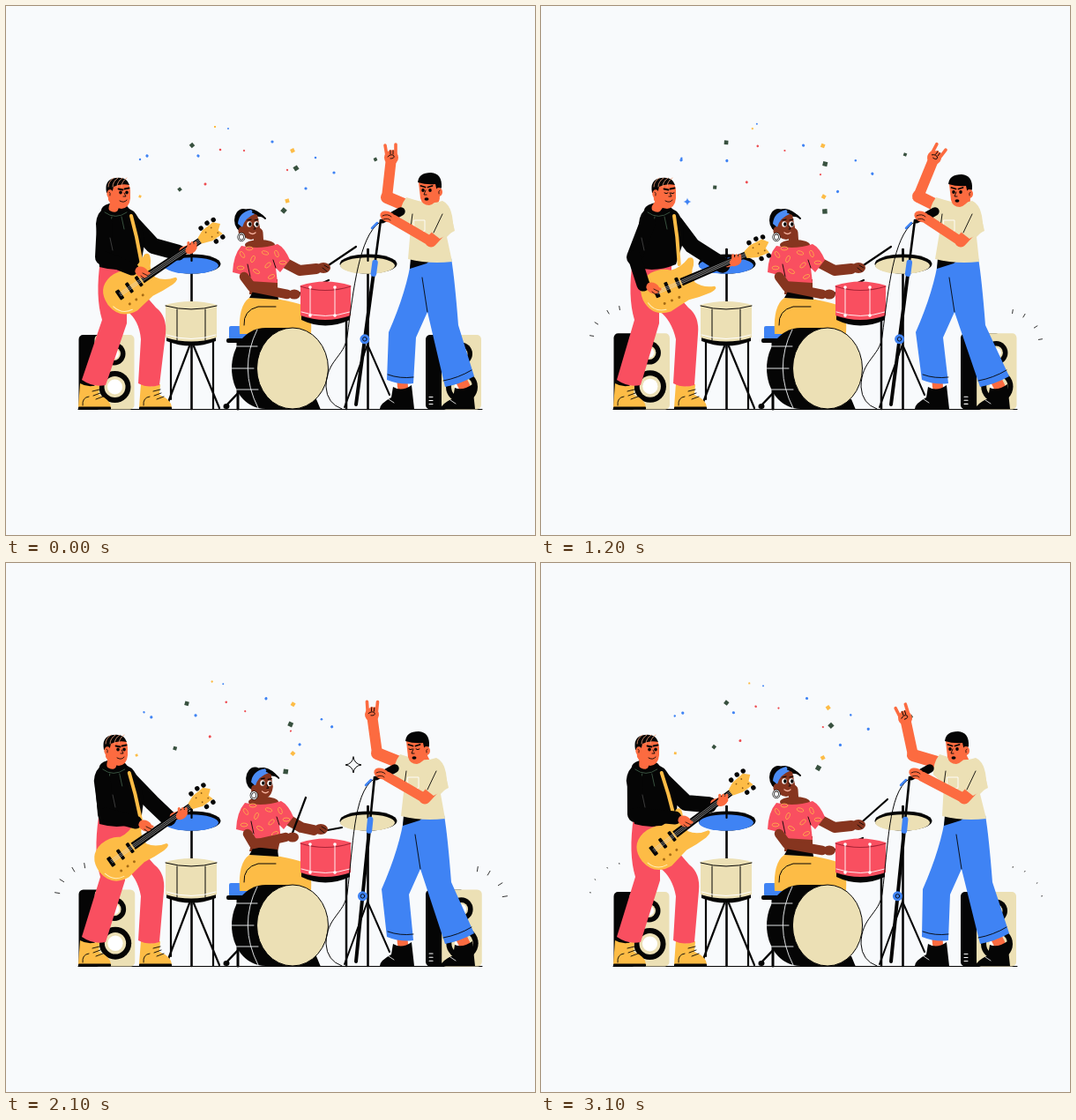
An HTML page with a canvas that plays this animation: 600 px wide and 600 px high, repeating every 3200 ms.

```html
<!DOCTYPE html>
<html lang="en">
<head>
<meta charset="utf-8">
<title>Band</title>
<style>
html, body { margin: 0; width: 100%; height: 100%; overflow: hidden; background: #f8fafc; }
canvas { display: block; width: 600px; height: 600px; }
</style>
</head>
<body>
<canvas id="stage"></canvas>
<script>
const LOOP = 3200, STEP = 100, TAU = Math.PI * 2;
const BG = '#f8fafc', INK = '#050505', CREAM = '#ece0b5', RED = '#f94f60', BLUE = '#3f83f4',
  GOLD = '#fdbc46', SKIN = '#fc6b40', BROWN = '#86351f', WHITE = '#fff', GREEN = '#38513f';
const canvas = document.getElementById('stage');
const g = canvas.getContext('2d');
const ratio = window.devicePixelRatio || 1;
canvas.width = canvas.height = 600 * ratio;
g.lineCap = g.lineJoin = 'round';

// ---- drawing helpers
function fill(color, d) { g.fillStyle = color; g.fill(new Path2D(d)); }
function line(color, w, d) { g.strokeStyle = color; g.lineWidth = w; g.stroke(new Path2D(d)); }
function limb(color, w, ...pts) { line(color, w, 'M' + pts.map(p => p.join(' ')).join('L')); }
function oval(color, x, y, rx, ry = rx, turn = 0) {
  g.fillStyle = color;
  g.beginPath(); g.ellipse(x, y, rx, ry, turn, 0, TAU); g.fill();
}
function ring(color, w, x, y, rx, ry = rx, turn = 0) {
  g.strokeStyle = color; g.lineWidth = w;
  g.beginPath(); g.ellipse(x, y, rx, ry, turn, 0, TAU); g.stroke();
}
function box(color, x, y, w, h, r = 0) {
  g.fillStyle = color;
  g.beginPath(); g.roundRect(x, y, w, h, r); g.fill();
}
function at(x, y, turn, draw) {
  g.save(); g.translate(x, y); g.rotate(turn); draw(); g.restore();
}

// Smooth cyclic interpolation through uneven keys.
function track(t, period, times, vals) {
  const n = times.length, p = ((t % period) + period) % period;
  const T = k => times[(k + n) % n] + Math.floor(k / n) * period;
  const V = k => vals[(k + n) % n];
  let i = n - 1;
  while (i > 0 && times[i] > p) i--;
  const slope = k => (V(k + 1) - V(k - 1)) / (T(k + 1) - T(k - 1));
  const h = T(i + 1) - T(i), u = (p - T(i)) / h, v = 1 - u;
  return V(i) * (1 + 2 * u) * v * v + V(i + 1) * (3 - 2 * u) * u * u
    + h * u * v * (slope(i) * v - slope(i + 1) * u);
}

// ---- speakers and drums
function speaker(x, u) {
  const grow = 0.05 * Math.exp(-(((u - 0.5) / 0.13) ** 2));
  g.save();
  g.translate(x, 457.5);
  g.scale(1 + grow * 0.4, 1 + grow);
  box(INK, 0, -84.5, 44, 84.5, 5);
  box(CREAM, 18, -84.5, 45, 84.5, 5);
  oval(INK, 40, -63, 13);
  oval(CREAM, 40, -63, 7.5);
  oval(WHITE, 40, -63, 5.5);
  oval(INK, 41, -25.5, 18);
  oval(CREAM, 41, -25.5, 12);
  oval(WHITE, 41, -25.5, 8.5);
  for (let i = 0; i < 3; i++) limb(WHITE, 1, [4, -14 + i * 4], [8, -14 + i * 4]);
  g.restore();
}

function noise(side, u) {
  const len = u < 0.2 ? 0 : u < 0.5 ? 10 * (u - 0.2) / 0.3 : Math.max(0.6, 10 * (2 - 2 * u) ** 3);
  if (!len || u > 0.95) return;
  const far = u < 0.5 ? 30 + len : 40;
  g.save();
  g.translate(side < 0 ? 95 : 529, side < 0 ? 380 : 384);
  g.scale(-side, 1);
  for (const a of [189, 212, 240, 261]) {
    const c = Math.cos(a * TAU / 360), s = Math.sin(a * TAU / 360);
    limb('#333', 1, [c * (far - len), s * (far - len)], [c * far, s * far]);
  }
  g.restore();
}

function cymbal(x, color) {
  limb(INK, 2.6, [x, 276], [x, 457]);
  oval(INK, x + 0.5, 292.5, 32.5, 11);
  oval(color, x - 0.5, 294.5, 31, 9.2);
  limb(INK, 2.2, [x, 276], [x, 289]);
}

function snare() {
  limb(INK, 2.2, [187, 380], [187, 446]);
  limb(INK, 2.2, [235, 380], [235, 457]);
  limb(INK, 2.2, [208, 386], [183, 452]);
  limb(INK, 2.2, [213, 386], [242, 456]);
  fill(INK, 'M182 372V380Q210 391 238 380V372Z');
  fill(CREAM, 'M181 339Q210 331 239 339V376Q210 385 181 376Z');
  line(INK, 1, 'M181 340Q210 348 239 340M194 344V379M226 344V379');
  line(WHITE, 1, 'M182 373Q210 382 238 373');
}

function tom() {
  limb(INK, 2.5, [386, 350], [386, 457]);
  fill(INK, 'M335 350V356Q362 369 390 356V350Z');
  fill(RED, 'M334 317Q362 308 391 317V351Q362 361 334 351Z');
  line('#a92436', 1.1, 'M334 318Q362 327 391 318');
  line(WHITE, 0.9, 'M335 347Q362 356 390 347M345 320V352M373 320V352');
  for (const x of [345, 373]) { oval(WHITE, x, 319, 1.8); oval(WHITE, x, 351, 1.8); }
}

function bass(grow) {
  limb(INK, 2.5, [268, 434], [248, 455]);
  oval(INK, 250, 454, 3.5, 3);
  fill(INK, 'M318 458L330 446H352L357 458Z');
  fill(INK, 'M325 365H295C270 365 256 388 256 411S270 457 295 457H325Z');
  line(BG, 0.9, 'M259 386H285M256 411H281M259 435H286M285 367Q263 411 286 456');
  oval(CREAM, 325, 411, 40.5 + grow, 46);
  ring(INK, 1, 325, 411, 40.5 + grow, 46);
}

function stool() {
  limb(INK, 3, [263, 378], [263, 457]);
  box(BLUE, 253, 363, 30, 15, 2);
  box(INK, 250, 377, 32, 5, 2);
}

// ---- drummer
function drummer(t) {
  const D = [0, 60, 140, 180, 320, 540, 560];
  const k = (...v) => track(t, 640, D, v);
  const phase = t % 640;
  const hx = k(275, 276, 282, 290, 311, 275, 275), hy = k(247, 249, 250, 249, 250, 247, 247);
  const s = k(0, 0, 2, 4, 8, 0, 0);
  const left = [k(327, 327, 322, 325, 325, 327, 327), k(327, 325, 314, 311, 315, 326, 327)];
  const leftTip = [k(366, 367, 351, 340, 332, 365, 366), k(311, 310, 275, 266, 268, 312, 311)];
  const right = [k(360, 360, 358, 357, 357, 360, 360), k(297, 296, 295, 302, 298, 297, 297)];
  const rightTip = [k(397, 393, 395, 381, 397, 393, 397), k(273, 268, 267, 300, 273, 268, 273)];

  fill(GOLD, 'M265 372Q263 340 276 331L306 332Q334 337 343 342Q347 347 346 372Z');
  line(INK, 1, 'M270 362Q269 345 286 341L306 341');
  fill(BROWN, `M${277 + s} 308L${308 + s} 310L308 328L276 327Z`);
  fill(INK, 'M281 322L308 325L309 333L276 331Z');

  limb(BROWN, 12, [312 + s, 289], [333 + s * 0.5, 300], [right[0] - 8, right[1] + 1]);
  limb(BROWN, 11, [286 + s * 0.6, 257], [287 + s, 273]);
  oval(BROWN, 288 + s, 271, 17, 6);
  at(s, 0, 0, () => {
    fill(RED, 'M267 272Q288 277 308 270Q316 274 322 288L311 302L306 297L308 314L276 312L277 307L257 302Q258 282 267 272Z');
    for (const [x, y, a] of [[268, 282, 1], [266, 297, 0], [280, 287, 2], [284, 301, 0.5],
      [294, 280, 0.3], [297, 294, 2.4], [307, 281, 1.2], [314, 291, 0], [301, 307, 2.7], [276, 275, 0]])
      ring('#ffa04d', 1, x, y, 4, 2, a);
    line(INK, 0.9, 'M277 307L274 293M306 297L303 288');
  });
  limb(BROWN, 10.5, [270 + s, 307], [279 + s * 0.5, 319], [left[0] - 8, left[1]]);
  limb(INK, 2.2, [left[0] - 3, left[1] + 3], leftTip);
  oval(BROWN, ...left, 7, 5.5);
  limb(INK, 2.2, [right[0] - 3, right[1] + 3], rightTip);
  oval(BROWN, ...right, 8, 6);
  line(INK, 0.8, `M${right[0] + 1} ${right[1] - 3}l5 3m-7 0l5 4`);

  const turn = (hx - 275) / 36;
  at(hx, hy, turn * 0.12, () => {
    oval(INK, -6 - turn * 5, -4, 10, 13);
    fill(INK, 'M-13 2Q-15 -17 2 -17Q11 -16 20 -6Q10 -10 5 -7L-5 8Z');
    fill(BROWN, 'M-8 -5Q0 -15 10 -10L13 4Q12 17 3 18Q-6 17 -9 8Z');
    fill('#4b8cf5', 'M-12 0Q-11 -13 3 -16L7 -11Q-4 -7 -7 4Z');
    line(INK, 1.8, 'M5 -13Q13 -12 19 -6');
    oval(BROWN, -8, 8, 3.5, 4.5);
    ring(INK, 2.4, -8, 15, 3.4, 4);
    ring(WHITE, 1.1, -8, 15, 3.4, 4);
    const shut = phase >= 40 && phase <= 150;
    for (const x of [1, 9]) {
      line(INK, 1.2, `M${x - 2} -4l4 -1`);
      if (shut) line(INK, 1, `M${x - 2} 1q2 2 4 0`);
      else { oval(WHITE, x, 0.5, 2.7, 3.2); oval(INK, x + 0.8, 0.5, 1.7, 2.2); }
    }
    line(INK, 0.9, 'M6 2l2 4h-2');
    line('#f6b3a0', 1.3, 'M1 10q4 3 7 0');
  });

  if (phase >= 110 && phase <= 165)
    line('#333', 1, 'M375 264l4 5M386 254l4 8M400 247l-1 14M414 252l-5 9M422 262l-7 4');
}

// ---- guitarist
function guitar() {
  fill(GOLD, 'M-38 2Q-38 -20 -18 -23Q-4 -24 4 -17Q16 -15 28 -22Q36 -22 30 -12Q22 -4 24 6Q30 16 43 19Q46 23 36 24Q22 24 10 22Q-2 24 -14 26Q-36 24 -38 2Z');
  box(INK, -23, -6, 5, 12, 1);
  box(INK, -9, -7, 4, 13, 1);
  box(INK, 4, -7, 4, 13, 1);
  for (const x of [-17, -8, 1]) oval('#a46a16', x, 15, 1.5);
  line('#fff0bd', 1, 'M-34 7Q-31 20 -18 22');
  fill(INK, 'M10 -4.5L92 -3.5V3.5L10 4.5Z');
  for (const y of [-1.7, 0, 1.7]) limb('#ddd', 0.5, [-20, y], [94, y]);
  for (const [x, y] of [[98, -11], [107, -12], [115, -11], [104, 11], [113, 11]]) oval(INK, x, y, 2.7);
  fill(GOLD, 'M89 -4L98 -8L113 -9L119 -3L113 2L115 8L101 8L89 4Z');
  for (const [x, y] of [[100, -4], [108, -5], [103, 4], [111, 4]]) oval('#8d5a15', x, y, 0.9);
}

function boot(x) {
  fill(GOLD, `M${x + 2} 428Q${x + 12} 434 ${x + 24} 429L${x + 23} 441Q${x + 36} 446 ${x + 37} 455H${x}Z`);
  box(INK, x, 454.5, 37, 3.2, 1);
  line(INK, 0.9, `M${x + 16} 437l8 -2M${x + 17} 442l8 -3M${x + 20} 446l8 -3M${x + 5} 453Q${x + 4} 444 ${x + 12} 443`);
}

function guitarist(t) {
  const G = [0, 133, 533, 567, 700, 967, 1033];
  const k = (...v) => track(t, LOOP / 3, G, v);
  const hx = k(128, 140, 138, 139, 125, 121, 125);
  const gx = k(146, 150, 152, 145, 145, 144, 136), gy = k(316, 317, 315, 315, 319, 314, 327);
  const turn = k(-34, -23, -28, -30, -35, -37, -35) * TAU / 360;
  const hip = k(0, -3, 0, 0, 0, -2, -2);
  const elbow = [k(110, 106, 113, 107, 98, 107, 113), 285];
  const strum = v => track(t, LOOP / 6, [0, 33, 133, 167, 433, 500], v);
  const hand = [strum([155, 148, 128, 131, 164, 159]), strum([302, 308, 320, 322, 293, 298])];
  const c = 0.75 * (hx - 128);
  const onNeck = d => [gx + d * Math.cos(turn) - 2 * Math.sin(turn), gy + d * Math.sin(turn) + 2 * Math.cos(turn)];
  const fret = onNeck(77);

  boot(82);
  boot(151);
  fill(RED, `M${107 + hip} 288Q${101 + hip} 330 ${109 + hip} 356L86 424Q99 433 113 430L${137 + hip} 360V346Q${151 + hip} 356 153 378L150 428Q161 434 174 430L${181 + hip} 372Q${183 + hip} 352 ${170 + hip} 342L${151 + hip} 320V288Z`);
  line(INK, 0.9, `M${137 + hip} 346L${133 + hip} 337`);

  limb(INK, 18, [143 + c, 246], [167 + c * 0.5, 272], [fret[0] - 16, fret[1] + 5]);
  limb(SKIN, 9, [fret[0] - 10, fret[1] + 3], fret);
  oval(INK, 124 + c, 232, 16, 9);
  fill(INK, `M${113 + c} 229Q${103 + c} 233 ${102 + c} 247L106 296Q130 303 153 293L${157 + c * 0.4} 270Q${155 + c} 244 ${145 + c} 233L${133 + c} 226Z`);
  limb(SKIN, 11, [hx - 4, 222], [122 + c, 229]);
  line(INK, 5, `M${112 + c} 231Q${124 + c} 242 ${136 + c} 230`);
  line(GREEN, 1, `M${120 + c} 239L${117 + c} 255M${131 + c} 239L${134 + c} 253M${112 + c} 234Q${124 + c} 243 ${137 + c} 234`);
  limb(GOLD, 4, [142 + c, 238], [148 + c * 0.7, 262], [154 + c * 0.3, 293]);
  const out = Math.max(0, (106 - elbow[0]) / 8);
  if (out > 0.3) limb(GOLD, 3.5, [113 + c, 262], [132 + c, 298]);

  at(gx, gy, turn, guitar);
  oval(SKIN, fret[0] - 1, fret[1] + 1, 7, 5, turn);
  for (let i = 0; i < 3; i++)
    limb(SKIN, 3, [fret[0] - 4 + i * 4, fret[1]], [fret[0] - 4 + i * 4, fret[1] - 6]);
  limb(INK, 18, [112 + c, 246], elbow);
  limb(INK, 15, elbow, [hand[0] - 12, hand[1] - 4]);
  line('#555', 0.7, `M${elbow[0] + 8} ${elbow[1] - 22}L${elbow[0] + 11} ${elbow[1] - 8}`);
  oval(SKIN, hand[0] - 1, hand[1], 8, 6, 0.5);
  limb(SKIN, 3.2, hand, [hand[0] + 7, hand[1] + 1]);
  line(INK, 0.8, `M${hand[0]} ${hand[1] + 1}l6 3m-8 0l4 3`);

  const phase = t % (LOOP / 3);
  at(hx, 212, 0, () => {
    fill(SKIN, 'M-13 -7Q-12 -16 0 -16Q12 -15 13 -3V6Q12 17 3 18Q-8 17 -12 8Z');
    fill(INK, 'M-14 0Q-17 -15 -4 -17Q9 -19 12 -9Q2 -11 -6 -7L-8 1Z');
    for (let i = 0; i < 4; i++) line('#f5a27d', 0.8, `M${-12 + i * 5} -7Q${-12 + i * 5} -13 ${-6 + i * 5} -17`);
    oval(SKIN, -10, 1, 3.7, 4.7);
    line(INK, 0.8, 'M-11 -1q2 1 1 4');
    const shut = phase > 100 && phase < 600;
    for (const x of [2, 9]) {
      line(INK, 1.8, `M${x - 2.5} -4.5l5 ${x < 5 ? 1 : -1}`);
      if (shut) line(INK, 1, `M${x - 2} 0q2 1.5 4 0`);
      else oval(INK, x, -0.5, 1.8, 2);
    }
    line(INK, 0.9, 'M6 0l2 4h-3M1 9q5 3 8 -1');
  });
}

// ---- singer
function singer(t) {
  const k = (...v) => track(t, 800, [0, 300, 400, 500, 700], v);
  const hx = k(481, 487, 476, 467, 472), hy = k(208, 210, 210, 210, 210);
  const s = k(0, -3, -6, -7, -2), p = k(0, -9, -9, -8, -1);
  const hand = [k(437, 467, 446, 415, 413), k(172, 178, 172, 172, 176)];
  const elbow = [k(432, 433, 428, 421, 422), k(217, 217, 216, 216, 218)];
  const wave = k(0, 0.95, 0.65, 0.1, -0.3);
  const top = [k(425, 431, 424, 418, 418), 243], foot = [397, 452];
  const along = u => [foot[0] + (top[0] - foot[0]) * u, foot[1] + (top[1] - foot[1]) * u];

  line(INK, 1, `M${top[0] - 2} 246C${top[0] - 24} 262 394 320 387 375C384 398 363 402 363 432Q364 451 381 457`);
  limb(INK, 2, [410, 384], [384, 455]);
  limb(INK, 2, [410, 384], [435, 441]);
  limb(INK, 4, foot, along(0.74));
  limb(INK, 2.6, along(0.7), top);
  limb(BLUE, 6.5, along(0.71), along(0.77));
  const [jx, jy] = along(0.355);
  oval(BLUE, jx, jy, 5.5);
  ring(INK, 0.9, jx, jy, 2.3);
  limb(BLUE, 2.5, [top[0] - 10, 252], [top[0] - 4, 246]);

  limb(SKIN, 12, [449, 420], [450, 432]);
  limb(SKIN, 13, [514, 420], [520, 432]);
  fill(INK, 'M439 432Q449 438 460 430L463 457H424Q424 451 437 444Z');
  fill(INK, 'M509 433Q518 437 529 429L532 457H493Q494 451 507 445Z');
  line(WHITE, 0.8, 'M434 446l6 4M504 447l6 4');
  fill(BLUE, `M${460 + p} 285Q${455 + p} 322 ${434 + p} 370L432 424Q447 430 462 428L${465 + p} 376L${478 + p} 347L498 432Q515 429 531 420L${513 + p} 362Q${509 + p} 310 ${505 + p} 286Z`);
  line(INK, 0.9, `M433 418Q447 423 462 421M496 425Q513 422 528 413M${478 + p} 347L${472 + p} 308`);
  fill(INK, `M${459 + p} 286H${485 + p}L${477 + p} 292L${458 + p} 298Z`);

  limb(SKIN, 14, [458 + s, 228], elbow);
  limb(SKIN, 12, elbow, hand);
  limb(SKIN, 12, [hx + 5, hy + 10], [482 + s, 226]);
  fill(CREAM, `M${464 + s} 220Q${481 + s} 226 ${495 + s} 221Q${503 + s} 224 ${506 + s} 238L${508 + s} 254L${500 + s} 262L${506 + p} 290Q${480 + p} 293 ${456 + p} 287L${459 + s} 251L${447 + s} 240Q${446 + s} 228 ${454 + s} 217Z`);
  line(WHITE, 0.9, `M${463 + s} 243h12v12l-6 2l-6 -3z`);
  line(INK, 0.9, `M${459 + s} 251L${461 + s} 236`);

  at(hand[0], hand[1], wave, () => {
    oval(SKIN, 0, 0, 8, 8);
    limb(SKIN, 3.6, [-5, -2], [-7, -14]);
    limb(SKIN, 3.6, [5, -2], [5, -15]);
    limb(SKIN, 3.8, [-1, -4], [-1, -7]);
    limb(SKIN, 3.8, [2, -4], [2, -7]);
    line(INK, 0.9, 'M-4 -1q4 -4 7 -1q1 3 -4 3M-1 -8v4M2 -8v4');
  });

  const elbow2 = [482 + s, 267];
  limb(INK, 9.5, [top[0] + 14, 238], [top[0] + 23, 233]);
  limb(INK, 5, [top[0] + 2, 244], [top[0] + 15, 238]);
  limb(SKIN, 13, [496 + s, 252], elbow2);
  limb(SKIN, 11, elbow2, [top[0] + 14, 242]);
  oval(SKIN, top[0] + 8, 239, 9, 6, 0.4);
  line(INK, 0.8, `M${top[0] + 2} 238q6 -3 10 1M${top[0] + 3} 242q5 -2 8 1`);
  fill(CREAM, `M${486 + s} 235L${503 + s} 229L${509 + s} 255L${492 + s} 264L${483 + s} 257Z`);
  line(INK, 0.9, `M${495 + s} 236L${485 + s} 257`);

  const shut = t >= 1500 && t <= 2200;
  at(hx, hy, 0, () => {
    fill(SKIN, 'M-13 -8Q0 -16 12 -8L12 6Q7 16 -1 18Q-9 18 -11 10Z');
    fill(INK, 'M-14 -8Q-13 -19 1 -19Q14 -18 13 -2L8 3L6 -6Q-4 -5 -14 -8Z');
    oval(SKIN, 10, 3, 4, 5);
    line(INK, 0.8, 'M11 1q-2 1 -1 4');
    for (const x of [-8, 0]) {
      line(INK, 1.8, `M${x - 2.5} ${x ? -4 : -2.5}l5 ${x ? 1.5 : -1.5}`);
      if (shut) line(INK, 1, `M${x - 2} 1q2 1.5 4 0`);
      else oval(INK, x, 1, 1.8, 2);
    }
    line(INK, 0.9, 'M-5 1l-2 5h3');
    oval(INK, -4, 11, 2.5, 1.8);
  });
}

// ---- confetti and sparkles
const bits = [
  [237, 137, 1, 0], [252, 139, 1, 1], [160, 170, 1.6, 1], [152, 174, 1.2, 1], [211, 158, 2.3, 3],
  [218, 170, 1.6, 1], [243, 163, 1.3, 2], [270, 164, 1.1, 2], [302, 154, 1.6, 1], [325, 164, 2.2, 0],
  [351, 172, 1.3, 1], [372, 189, 1.6, 1], [329, 184, 2.6, 3], [319, 186, 1.1, 2], [226, 202, 1.5, 2],
  [197, 208, 2, 3], [152, 216, 1.4, 0], [319, 221, 2.2, 0], [315, 232, 2.7, 3], [340, 207, 1.6, 1],
  [419, 174, 1.8, 3]
];
function confetti(t) {
  const a = t / LOOP * TAU;
  bits.forEach(([x, y, r, c], i) => {
    const dx = 4 * (Math.sin(a + i * 1.7) - Math.sin(i * 1.7));
    const dy = 3 * (Math.sin(a + i * 2.3) - Math.sin(i * 2.3));
    at(x + dx, y + dy, i + a, () => {
      const color = [GOLD, BLUE, '#ee4b50', GREEN][c];
      if (c === 1 || c === 2) oval(color, 0, 0, r); else box(color, -r, -r, 2 * r, 2 * r);
    });
  });
}

function sparkle(t, peak, x, y, r, color, hollow) {
  const life = 1 - Math.abs(t - peak) / 300;
  if (life <= 0) return;
  const q = r * life, d = `M0 ${-q}Q${q * 0.12} ${-q * 0.12} ${q} 0Q${q * 0.12} ${q * 0.12} 0 ${q}Q${-q * 0.12} ${q * 0.12} ${-q} 0Q${-q * 0.12} ${-q * 0.12} 0 ${-q}Z`;
  at(x, y, 0, () => hollow ? line(color, 1, d) : fill(color, d));
}

function draw(t) {
  g.setTransform(ratio, 0, 0, ratio, 0, 0);
  g.fillStyle = BG;
  g.fillRect(0, 0, 600, 600);
  const beat = LOOP / 7, u = (t % beat) / beat;
  confetti(t);
  limb(INK, 1, [82, 457.5], [540, 457.5]);
  speaker(82.5, u);
  speaker(476, u);
  noise(-1, u);
  noise(1, u);
  cymbal(210.5, BLUE);
  cymbal(410.5, CREAM);
  snare();
  stool();
  drummer(t);
  bass(track(t, 640, [0, 60, 140, 180, 320, 560], [0, 2.5, 2.5, 0, 1.5, -1]));
  tom();
  guitarist(t);
  singer(t);
  sparkle(t, 700, 161, 201, 10, INK, true);
  sparkle(t, 1200, 166, 222, 4.5, BLUE);
  sparkle(t, 1600, 352, 282, 7, GOLD);
  sparkle(t, 2100, 394, 229, 9, INK, true);
}

const start = performance.now();
function frame() {
  const t = (performance.now() - start) % LOOP;
  draw(Math.floor(t / STEP) * STEP);
  requestAnimationFrame(frame);
}
draw(0);
requestAnimationFrame(frame);
</script>
</body>
</html>
```
